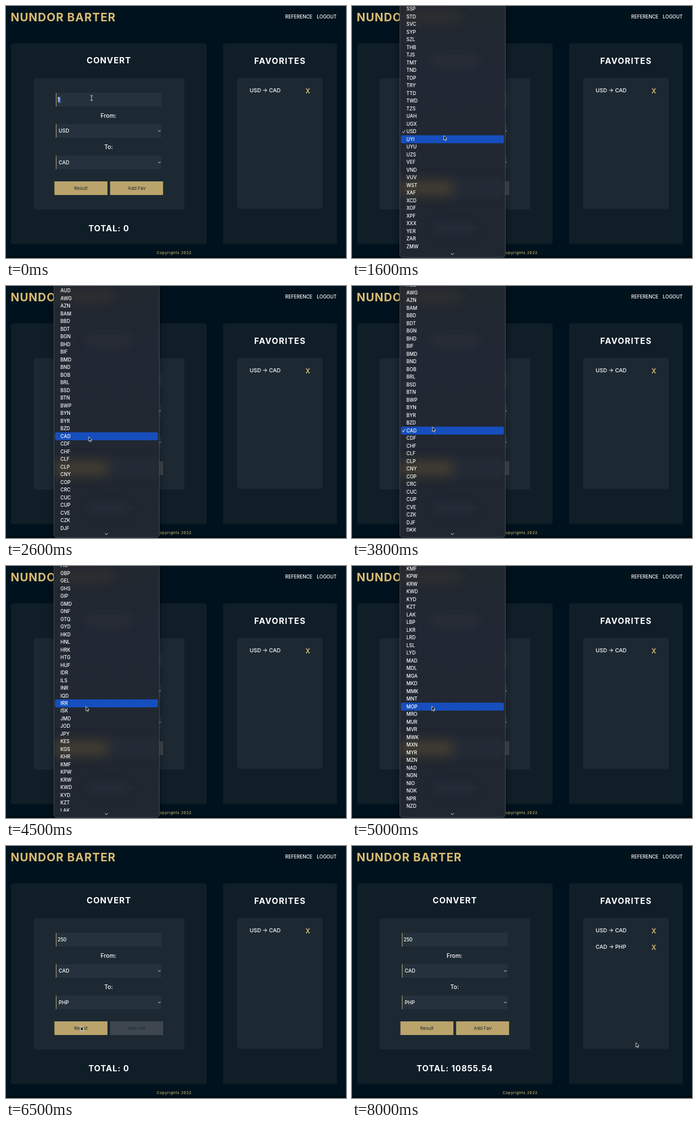
These frames come from a looping animation (600 by 444 pixels, 8200 ms). An HTML page:

```html
<!DOCTYPE html>
<html lang="en">
<head>
<meta charset="utf-8">
<title>Currency converter</title>
<style>
  html, body { margin: 0; width: 100%; height: 100%; overflow: hidden; background: #00121d; }
  svg { display: block; width: 600px; height: 444px; font-family: Inter, "Open Sans", sans-serif; }
  text { fill: #fff; white-space: pre; }
  .logo { font-size: 20px; font-weight: 700; letter-spacing: 1px; fill: #d9bd72; }
  .nav { font-size: 8.3px; font-weight: 450; }
  .title { font-size: 14.6px; font-weight: 700; letter-spacing: .9px; text-anchor: middle; }
  .wide { letter-spacing: 1.2px; }
  .total { font-size: 14.4px; }
  .label { font-size: 10.2px; font-weight: 450; text-anchor: middle; }
  .value { font-size: 8.7px; font-weight: 500; }
  .amount { font-size: 8.5px; font-weight: 500; }
  .fav { font-size: 9.5px; font-weight: 450; }
  .drop { font-size: 11.5px; font-weight: 600; fill: #d9bd72; text-anchor: middle; }
  .btn { font-size: 8.2px; text-anchor: middle; fill: #1c2931; }
  .foot { font-size: 6.5px; font-weight: 500; letter-spacing: .65px; fill: #d0b56e; text-anchor: middle; }
  .panel { fill: #101e28; }
  .card { fill: #1c2933; }
  .field { fill: #25323d; }
  .edge { fill: #bda874; }
  .gold { fill: #bba46c; }
  .line { fill: none; stroke: #fff; stroke-width: .9; stroke-linecap: round; stroke-linejoin: round; }
  #rows text { font-size: 8.4px; font-weight: 450; }
</style>
</head>
<body>
<svg viewBox="0 0 600 444">
  <defs>
    <filter id="soft" x="-50%" y="-200%" width="200%" height="500%"><feGaussianBlur stdDeviation="10"/></filter>
    <filter id="shade" x="-20%" width="140%"><feGaussianBlur stdDeviation="7"/></filter>
    <linearGradient id="menuFill" x1="0" y1="0" x2="0" y2="1">
      <stop offset="0" stop-color="#22282f"/>
      <stop offset=".25" stop-color="#222833"/>
      <stop offset="1" stop-color="#202731"/>
    </linearGradient>
    <clipPath id="menuClip"><rect x="84.5" y="-10" width="186" height="453" rx="5"/></clipPath>
    <clipPath id="rowClip"><rect x="84" y="0" width="186" height="432.5"/></clipPath>
    <path id="ibeam" d="M-2-4.2Q0-4.2 0-3V3Q0 4.2-2 4.2M2-4.2Q0-4.2 0-3M2 4.2Q0 4.2 0 3M-1 .8H1"/>
  </defs>

  <rect width="600" height="444" fill="#00121d"/>
  <rect y="440" width="600" height="4" fill="#000c14"/>
  <text class="logo" x="8.2" y="26.6">NUNDOR BARTER</text>
  <text class="nav" x="492.8" y="22.2">REFERENCE</text>
  <text class="nav" x="548.6" y="22.2">LOGOUT</text>

  <rect class="panel" x="9" y="66" width="345" height="353.5" rx="4"/>
  <rect class="card" x="48.5" y="127.5" width="266" height="231" rx="4"/>
  <text class="title" x="181.5" y="101">CONVERT</text>

  <rect class="field" x="88" y="153" width="186.5" height="24"/>
  <rect class="edge" x="88" y="153" width="1" height="24"/>
  <rect id="mark" x="91.2" y="160" width="5" height="10.5" fill="#4f78b8"/>
  <text id="amount" class="amount" x="91" y="168.2"></text>

  <text class="label" x="181" y="196.7">From:</text>
  <rect class="field" x="88" y="208" width="186.5" height="24"/>
  <rect class="edge" x="88" y="208" width="1" height="24"/>
  <text id="from" class="value" x="93.1" y="223.3"></text>
  <path class="line" d="M268.8 219.4l1.8 1.8 1.8-1.8"/>

  <text class="label" x="181" y="252">To:</text>
  <rect class="field" x="88" y="263.5" width="186.5" height="24"/>
  <rect class="edge" x="88" y="263.5" width="1" height="24"/>
  <text id="to" class="value" x="93.1" y="278.8"></text>
  <path class="line" d="M268.8 274.9l1.8 1.8 1.8-1.8"/>

  <rect class="gold" x="85.5" y="309" width="93.5" height="24"/>
  <text class="btn" x="132.3" y="324.2">Result</text>
  <rect id="add" x="183.7" y="309" width="93.5" height="24"/>
  <text class="btn" x="230.5" y="324.2">Add Fav</text>
  <text id="total" class="title total" x="181.5" y="396.6"></text>

  <rect class="panel" x="383" y="66" width="201" height="353.5" rx="4"/>
  <rect class="card" x="408" y="126.5" width="151" height="231" rx="4"/>
  <text class="title wide" x="483.7" y="102">FAVORITES</text>
  <text class="fav" x="430" y="152">USD → CAD</text>
  <text class="drop" x="532.7" y="154.1">X</text>
  <g id="newFav">
    <text class="fav" x="430" y="181">CAD → PHP</text>
    <text class="drop" x="532.7" y="183.1">X</text>
  </g>
  <text class="foot" x="296.8" y="436.8">Copyrights 2022</text>

  <g id="menu">
    <rect x="84" y="-10" width="187" height="454" fill="#000" opacity=".4" filter="url(#shade)"/>
    <g clip-path="url(#menuClip)">
      <rect x="84" y="-10" width="187" height="454" fill="url(#menuFill)"/>
      <g filter="url(#soft)">
        <rect x="84" y="10" width="106" height="18" fill="#5a5036" opacity=".22"/>
        <rect x="142" y="88" width="78" height="15" fill="#4a515b" opacity=".2"/>
        <rect x="84" y="309" width="95" height="24" fill="#54492f" opacity=".7"/>
        <rect x="184" y="309" width="90" height="24" fill="#333943" opacity=".25"/>
        <rect x="146" y="384" width="70" height="15" fill="#4a515b" opacity=".18"/>
      </g>
    </g>
    <rect x="84.5" y="-10" width="186" height="453" rx="5" fill="none" stroke="#50545d" stroke-width=".8"/>
    <g clip-path="url(#rowClip)">
      <rect id="bar" x="86.5" width="181.5" height="14" rx="2.5" fill="#164fbd"/>
      <g id="rows">
        <path id="tick" class="line" d="M89 .4l1.6 2 2.8-4.6"/>
      </g>
    </g>
    <path class="line" d="M174.8 435.8l2.4 2.4 2.4-2.4"/>
  </g>

  <g id="cursor">
    <path id="arrow" d="M0 0V7.8L1.8 6.1 3 8.9l1.4-.6L3.2 5.6H5.6z" fill="#000" stroke="#fff" stroke-width=".8" stroke-linejoin="round"/>
    <g id="beam" fill="none">
      <use href="#ibeam" stroke="#d8dcdf" stroke-width="1.9"/>
      <use href="#ibeam" stroke="#111a22" stroke-width=".7"/>
    </g>
  </g>
</svg>

<script>
const LOOP = 8200, TICK = 100, ROW = 13.49;
const codes = (
  'AED AFN ALL AMD ANG AOA ARS AUD AWG AZN BAM BBD BDT BGN BHD BIF BMD BND BOB BRL BSD BTN BWP BYN BYR BZD ' +
  'CAD CDF CHF CLF CLP CNY COP CRC CUC CUP CVE CZK DJF DKK DOP DZD EGP ERN ETB EUR FJD FKP GBP GEL GHS GIP ' +
  'GMD GNF GTQ GYD HKD HNL HRK HTG HUF IDR ILS INR IQD IRR ISK JMD JOD JPY KES KGS KHR KMF KPW KRW KWD KYD ' +
  'KZT LAK LBP LKR LRD LSL LYD MAD MDL MGA MKD MMK MNT MOP MRO MUR MVR MWK MXN MYR MZN NAD NGN NIO NOK NPR ' +
  'NZD OMR PAB PEN PGK PHP PKR PLN PYG QAR RON RSD RUB RWF SAR SBD SCR SDG SEK SGD SHP SLL SOS SRD SSP STD ' +
  'SVC SYP SZL THB TJS TMT TND TOP TRY TTD TWD TZS UAH UGX USD UYI UYU UZS VEF VND VUV WST XAF XCD XOF XPF ' +
  'XXX YER ZAR ZMW ZWL').split(' ');

const $ = id => document.getElementById(id);
const show = (id, on) => $(id).setAttribute('display', on ? 'inline' : 'none');
const move = (id, x, y) => $(id).setAttribute('transform', `translate(${x} ${y})`);
const smooth = k => k * k * (3 - 2 * k);
const linear = k => k;

// Scroll offset that puts the row of a code at height y
const at = (time, code, y) => [time, y - codes.indexOf(code) * ROW];

const path = [
  [0, 151, 162], [600, 151, 162], [800, 154, 166], [900, 154, 166],
  [1200, 168, 219], [1400, 166, 222], [1600, 162, 228.5], [1900, 152, 250],
  [2400, 146, 265], [2700, 146, 266], [2800, 146, 266], [3300, 176, 274],
  [3500, 160, 272], [3700, 142, 248.6], [3900, 142, 248.4], [4500, 141, 247.5],
  [5000, 141, 247], [5600, 136, 152.8], [5800, 134, 147], [5900, 134, 147],
  [6500, 132, 318], [6800, 133, 319], [7200, 228, 320], [7400, 228, 320], [8000, 501, 346.5]
];
const menus = [
  { open: 1300, close: 2900, picked: 'USD', ease: smooth,
    scroll: [at(1600, 'USD', 221.3), at(2500, 'CAD', 264.8)] },
  { open: 3500, close: 6000, picked: 'CAD', ease: linear,
    scroll: [at(3600, 'CAD', 276), at(3800, 'CAD', 254.7), at(4500, 'IRR', 242), at(5500, 'PKR', 159.1)] }
];

function track(keys, t, ease) {
  if (t <= keys[0][0]) return keys[0].slice(1);
  const i = keys.findIndex(k => k[0] > t);
  if (i < 0) return keys[keys.length - 1].slice(1);
  const a = keys[i - 1], b = keys[i];
  const k = ease((t - a[0]) / (b[0] - a[0]));
  return a.slice(1).map((v, n) => v + (b[n + 1] - v) * k);
}

codes.forEach((code, i) => {
  const row = document.createElementNS('http://www.w3.org/2000/svg', 'text');
  row.setAttribute('x', 96);
  row.setAttribute('y', i * ROW + 3);
  row.textContent = code;
  $('rows').append(row);
});

function draw(t) {
  const [x, y] = track(path, t, smooth);
  const inField = t < 1000, done = t >= 6800;
  move('cursor', x, y);
  show('beam', inField);
  show('arrow', !inField);

  show('mark', t < 100);
  $('amount').textContent = t < 100 ? '1' : '250'.slice(0, Math.floor(t / 100));
  $('from').textContent = t < 2900 ? 'USD' : 'CAD';
  $('to').textContent = t < 6000 ? 'CAD' : 'PHP';
  $('total').textContent = 'TOTAL: ' + (done ? '10855.54' : '0');
  $('add').setAttribute('fill', t < 100 || done ? '#bba46c' : '#3e474f');
  show('newFav', t >= 7500);

  const menu = menus.find(m => t >= m.open && t < m.close);
  show('menu', menu);
  if (!menu) return;
  const [top] = track(menu.scroll, t, menu.ease);
  const hover = Math.round((y - top) / ROW);
  move('rows', 0, top);
  move('tick', 0, codes.indexOf(menu.picked) * ROW);
  $('bar').setAttribute('y', top + hover * ROW - 7);
}

function loop() {
  const t = performance.now() % LOOP;
  draw(Math.floor(t / TICK) * TICK);
  requestAnimationFrame(loop);
}
loop();
</script>
</body>
</html>
```
